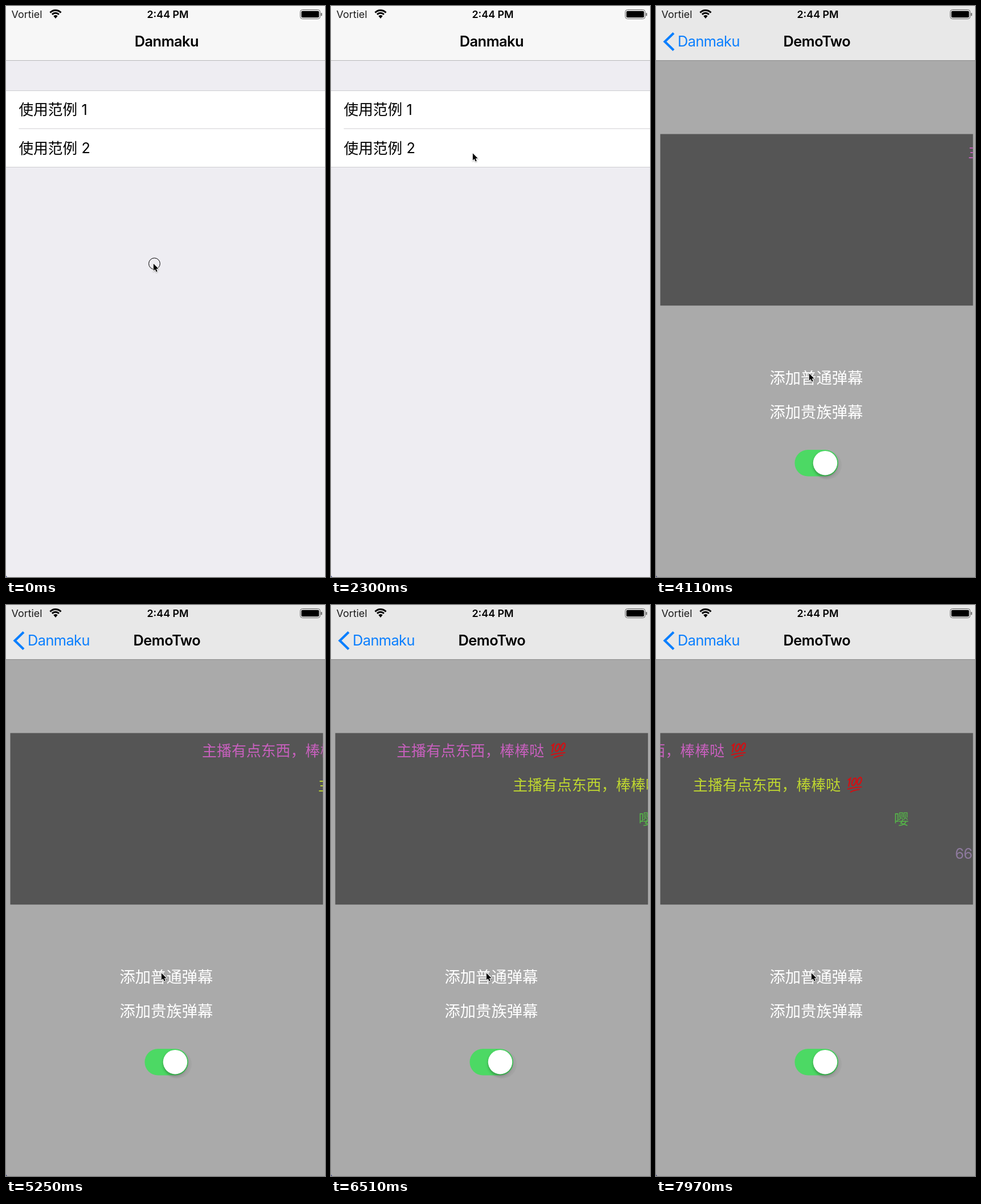
Animation, 560 px wide and 1001 px high, one loop 8000 ms. Source, as an HTML page with a canvas:

```html
<!DOCTYPE html>
<html lang="zh">
<head>
<meta charset="utf-8">
<title>Danmaku</title>
<style>
  html, body { margin: 0; width: 100%; height: 100%; overflow: hidden; }
  canvas { display: block; width: 560px; height: 1001px; }
</style>
</head>
<body>
<canvas id="stage" width="560" height="1001"></canvas>
<script>
const ctx = document.getElementById('stage').getContext('2d');
const W = 560, H = 1001, LOOP = 8000;
const SANS = 'Inter, "Liberation Sans", sans-serif';
const HAN = '"Noto Sans CJK SC", "Noto Sans CJK", sans-serif';
const PUSH_START = 2400, PUSH_END = 2840;
const PANEL = { x: 7.5, y: 224.5, w: 549, h: 300.7 };
const PRESSES = [[0, 50], [2190, 2300], [3820, 4040], [5050, 5190], [6140, 6290], [7420, 7590]];

// Each key is [time, value, ...].
const CURSOR = [[1160, 258.5, 451], [1830, 248.5, 257.5], [2980, 248.5, 257.5],
                [3530, 268.5, 643.5], [4630, 268.5, 643.5], [4750, 272.5, 644.5]];
const SCROLL = [[4110, 548.3], [5250, 344.3], [6510, 115.3], [7100, 14.3], [7970, -138.7]];

const clamp = v => Math.min(1, Math.max(0, v));
const mix = (a, b, p) => a + (b - a) * p;
const smooth = p => p * p * (3 - 2 * p);
const easeOut = p => 1 - (1 - p) ** 3;

function along(keys, t, index, ease = p => p, extend = false) {
  let i = 0;
  while (i < keys.length - 2 && t >= keys[i + 1][0]) i++;
  const a = keys[i], b = keys[i + 1];
  const p = (t - a[0]) / (b[0] - a[0]);
  return mix(a[index], b[index], ease(extend ? p : clamp(p)));
}

function rect(x, y, w, h, color) {
  ctx.fillStyle = color;
  ctx.fillRect(x, y, w, h);
}

function pill(x, y, w, h, r, color) {
  ctx.fillStyle = color;
  ctx.beginPath();
  ctx.roundRect(x, y, w, h, r);
  ctx.fill();
}

function disc(x, y, r, color) {
  pill(x - r, y - r, 2 * r, 2 * r, r, color);
}

function text(str, x, y, font, color, { align = 'left', spacing = 0, alpha = 1 } = {}) {
  ctx.save();
  ctx.font = font;
  ctx.fillStyle = color;
  ctx.textAlign = align;
  ctx.letterSpacing = spacing + 'px';
  ctx.globalAlpha *= alpha;
  ctx.fillText(str, x, y);
  ctx.restore();
}

function polyline(points, width, color) {
  ctx.strokeStyle = color;
  ctx.lineWidth = width;
  ctx.beginPath();
  points.forEach(([x, y]) => ctx.lineTo(x, y));
  ctx.stroke();
}

function drawList(shift, pressed) {
  ctx.save();
  ctx.translate(shift, 0);
  rect(0, 0, W, H, '#eeedf2');
  rect(0, 148, W, 135, '#fff');
  if (pressed) rect(0, 215, W, 67, '#d9d9d9');
  rect(0, 148, W, 1, '#cdccd1');
  rect(22.5, 214.5, W, 1, '#cfced2');
  rect(0, 282, W, 1, '#cdccd1');
  [190.5, 258].forEach((y, i) => {
    text('使用范例', 22.5, y + .5, '350 25.7px ' + HAN, '#000');
    text(String(i + 1), 132.5, y, '25.4px ' + SANS, '#000');
  });
  ctx.restore();
}

function drawSwitch() {
  pill(243.5, 778, 76.5, 46.5, 23.2, '#4cd964');
  disc(301, 805, 25, 'rgba(0,0,0,.035)');
  ctx.save();
  ctx.shadowColor = 'rgba(0,0,0,.26)';
  ctx.shadowBlur = 5;
  ctx.shadowOffsetY = 3;
  disc(297, 801.2, 21.2, '#fff');
  ctx.restore();
}

function drawHundred(x, y) {
  const red = '#d01014';
  ctx.save();
  ctx.translate(x, y);
  ctx.lineCap = 'round';
  polyline([[2.5, 5.5], [6, 3], [3, 16.5]], 2.3, red);
  for (const [cx, cy] of [[12.5, 9], [21.8, 7.6]]) {
    ctx.beginPath();
    ctx.ellipse(cx, cy, 3.2, 6.8, .38, 0, 7);
    ctx.stroke();
  }
  ctx.lineWidth = 2;
  ctx.beginPath();
  ctx.moveTo(1.5, 21.8);
  ctx.quadraticCurveTo(12, 18.5, 25.5, 18);
  ctx.moveTo(6.5, 26.8);
  ctx.quadraticCurveTo(13, 23.2, 21.5, 22.5);
  ctx.stroke();
  ctx.restore();
}

function drawComments(t) {
  const praise = '主播有点东西，棒棒哒', han = '350 25.9px ' + HAN;
  const x = along(SCROLL, t, 1, p => p, true);
  ctx.save();
  ctx.beginPath();
  ctx.rect(PANEL.x, PANEL.y, PANEL.w, PANEL.h);
  ctx.clip();
  [[x, '#c860be'], [x + 204, '#bfd730']].forEach(([left, color], row) => {
    text(praise, left, 264.5 + row * 60, han, color);
    drawHundred(left + 270, 241 + row * 60);
  });
  text('嘤', 540 - (t - 6510) * .0836, 384.5, han, '#55b548');
  text('666', 525 - (t - 7970) * .09, 444.5, '25.4px ' + SANS, '#8e7a9e', { spacing: -.6 });
  ctx.restore();
}

function drawDemo(t, shift) {
  ctx.save();
  ctx.translate(shift, 0);
  rect(0, 0, W, H, '#aaa');
  rect(PANEL.x, PANEL.y, PANEL.w, PANEL.h, '#555');
  text('添加普通弹幕', 199.5, 661.5, '350 27.3px ' + HAN, '#fff');
  text('添加贵族弹幕', 199.5, 721.5, '350 27.3px ' + HAN, '#fff');
  drawSwitch();
  if (t > 3900) drawComments(t);
  ctx.restore();
}

function drawStatus() {
  text('Vortiel', 9.5, 20.5, '17.9px ' + SANS, '#1c1c1c');
  text('2:44 PM', 284, 20.5, '600 17.9px ' + SANS, '#000', { align: 'center' });

  ctx.strokeStyle = '#000';
  ctx.lineWidth = 3;
  for (const r of [13, 8.2]) {
    ctx.beginPath();
    ctx.arc(87, 20.5, r, -Math.PI * .76, -Math.PI * .24);
    ctx.stroke();
  }
  ctx.fillStyle = '#000';
  ctx.beginPath();
  ctx.moveTo(87, 22);
  ctx.arc(87, 21, 5, -Math.PI * .76, -Math.PI * .24);
  ctx.fill();

  ctx.strokeStyle = '#666';
  ctx.lineWidth = 1;
  ctx.beginPath();
  ctx.roundRect(516.5, 6.5, 35, 16, 4);
  ctx.stroke();
  pill(518.5, 8.7, 31, 11.6, 2, '#000');
  pill(552.8, 12, 2, 5.5, 1, '#666');
}

function drawBar(p) {
  const shade = Math.round(mix(247, 232, p));
  rect(0, 0, W, 95, `rgb(${shade},${shade},${shade})`);
  rect(0, 95, W, 1, p < .5 ? '#b8b8ba' : '#8e8e8e');
  drawStatus();

  const bold = '600 25.4px ' + SANS, tight = { spacing: -.5 };
  const back = mix(225.7, 38, p);
  text('Danmaku', back, 71, bold, '#000', { ...tight, alpha: clamp(1 - p * 1.6) });
  text('Danmaku', back, 71, '25.4px ' + SANS, '#0b7ffe', { spacing: -.6, alpha: p });
  text('DemoTwo', mix(500, 223.5, p), 71, bold, '#000', { ...tight, alpha: p });
  ctx.save();
  ctx.globalAlpha = p;
  polyline([[31, 47.5], [15.5, 62.5], [31, 77.5]], 4.2, '#0b7ffe');
  ctx.restore();
}

function drawCursor(t) {
  const x = along(CURSOR, t, 1, smooth), y = along(CURSOR, t, 2, smooth);
  if (PRESSES.some(([from, to]) => t >= from && t < to)) {
    ctx.strokeStyle = '#000';
    ctx.lineWidth = 1;
    ctx.beginPath();
    ctx.arc(x + 2, y + .7, 9.9, 0, 7);
    ctx.stroke();
  }
  ctx.save();
  ctx.translate(x + .4, y + .7);
  ctx.beginPath();
  [[0, 0], [0, 12.4], [2.8, 9.8], [4.8, 14.4], [6.8, 13.5], [4.9, 9], [8.7, 8.8]]
    .forEach(([px, py]) => ctx.lineTo(px, py));
  ctx.closePath();
  ctx.shadowColor = 'rgba(0,0,0,.3)';
  ctx.shadowBlur = 2;
  ctx.shadowOffsetY = 1;
  ctx.strokeStyle = '#fff';
  ctx.lineWidth = 1.8;
  ctx.stroke();
  ctx.shadowColor = 'transparent';
  ctx.fillStyle = '#000';
  ctx.fill();
  ctx.restore();
}

function draw(t) {
  const p = easeOut(clamp((t - PUSH_START) / (PUSH_END - PUSH_START)));
  if (p < 1) {
    drawList(-W * .3 * p, p > 0);
    if (p > 0) rect(0, 0, W, H, `rgba(0,0,0,${.1 * p})`);
  }
  if (p > 0) drawDemo(t, W * (1 - p));
  drawBar(p);

  ctx.fillStyle = '#202a78';
  ctx.beginPath();
  ctx.moveTo(0, H - 4);
  ctx.quadraticCurveTo(0, H, 3, H);
  ctx.lineTo(0, H);
  ctx.fill();

  drawCursor(t);
}

const start = performance.now();
function tick() {
  draw((performance.now() - start) % LOOP);
  requestAnimationFrame(tick);
}
tick();
</script>
</body>
</html>
```
